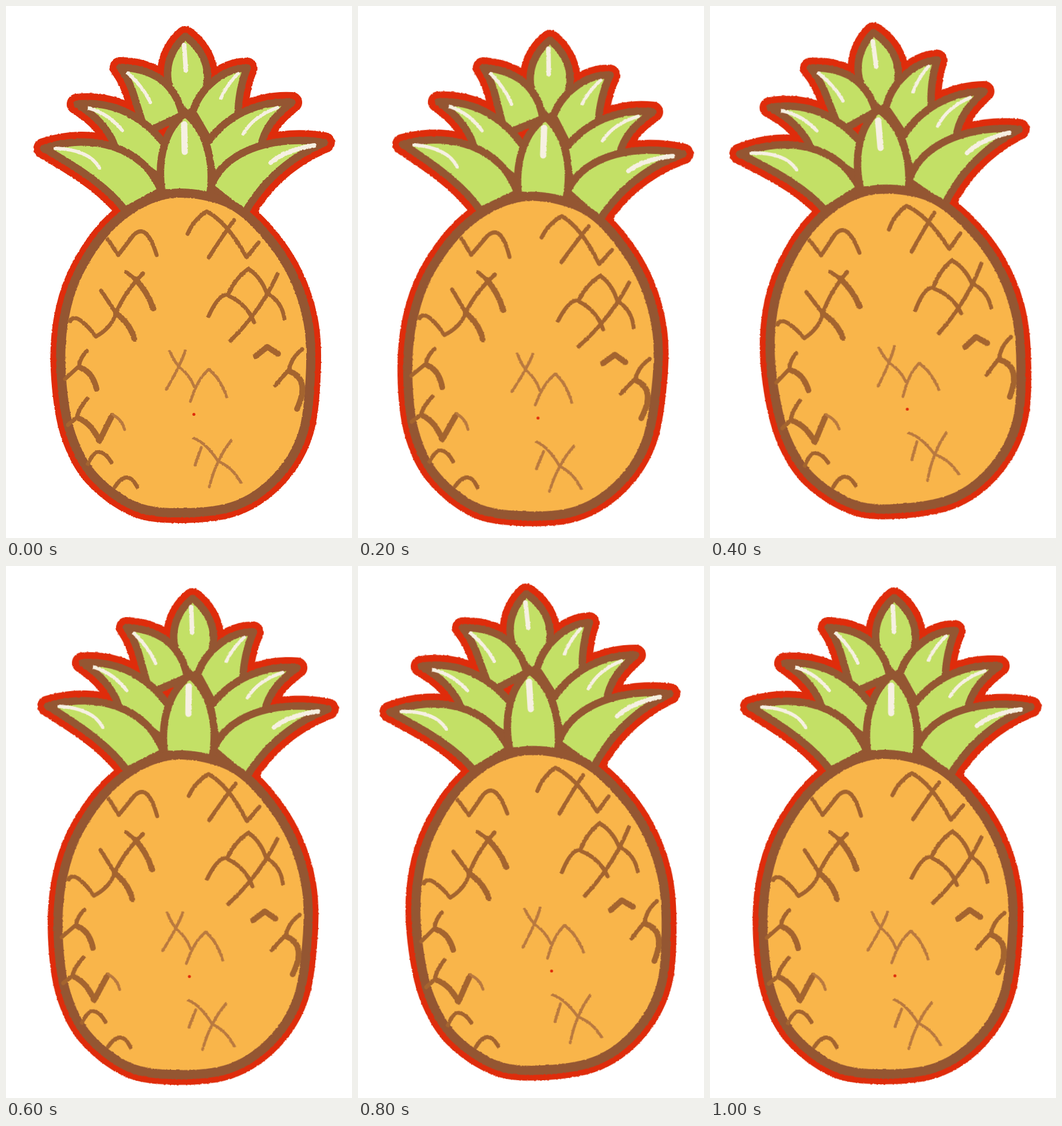
An HTML page for the animation above (1.2 s loop, 604 by 927 pixels).

```html
<!DOCTYPE html>
<html lang="en">
<head>
<meta charset="utf-8">
<title>Pineapple</title>
<style>
  html, body { margin: 0; width: 100%; height: 100%; overflow: hidden; background: #fff; }
  svg { display: block; width: 100%; height: 100%; }
  .fruit { transform-origin: 203px 463px; animation: wobble 1200ms step-end infinite; }
  @keyframes wobble {
    0%, 100% { transform: rotate(0deg); }
    16.66% { transform: rotate(3.13deg); }
    33.33% { transform: rotate(-3.85deg); }
    50% { transform: rotate(1.79deg); }
    66.66% { transform: translateX(-1px) rotate(-2.55deg); }
    83.33% { transform: rotate(1.19deg); }
  }
  path { stroke-linecap: round; stroke-linejoin: round; }
  .rim { fill: #df2c0b; stroke: #df2c0b; stroke-width: 36; }
  .leaf { fill: #c3e066; stroke: #945632; stroke-width: 13; }
  .flesh { fill: #f9b54a; stroke: #945632; stroke-width: 16; }
  .shine { fill: none; stroke: #f6f0e2; stroke-width: 6; }
  .marks { fill: none; stroke: #a4642f; stroke-width: 7; }
  .bold { stroke-width: 10; }
  .faint { stroke: #b9793f; stroke-width: 5; }
</style>
</head>
<body>
<svg viewBox="0 0 604 927">
  <defs>
    <filter id="rough" filterUnits="userSpaceOnUse" x="0" y="0" width="604" height="927" color-interpolation-filters="sRGB">
      <feTurbulence type="fractalNoise" baseFrequency=".3" seed="4"/>
      <feDisplacementMap in="SourceGraphic" scale="3" xChannelSelector="R" yChannelSelector="G"/>
    </filter>
    <!-- Leaves from back to front; each line is the middle of its outline -->
    <g id="leaves">
      <path d="M313 53C280 80 262 140 318 190C374 140 352 80 313 53Z"/>
      <path d="M199 107C250 108 295 130 308 190L245 220C230 190 225 140 199 107Z"/>
      <path d="M421 108C375 108 335 150 326 185L355 235L405 195C405 165 410 135 421 108Z"/>
      <path d="M124 171C185 165 240 190 280 245L270 300L190 245C180 215 155 190 124 171Z"/>
      <path d="M499 168C440 165 385 190 350 240L362 300L445 245C450 215 470 190 499 168Z"/>
      <path d="M66 248C150 220 240 245 271 322L208 356C180 320 140 290 66 248Z"/>
      <path d="M556 238C480 225 385 245 357 315L416 362C440 320 480 270 556 238Z"/>
      <path d="M313 187C280 212 263 260 272 325L356 330C365 265 346 212 313 187Z"/>
    </g>
    <path id="body"/>
  </defs>

  <g class="fruit">
    <g filter="url(#rough)">
      <g class="rim"><use href="#leaves"/><use href="#body"/></g>
      <use class="leaf" href="#leaves"/>
      <use class="flesh" href="#body"/>

      <g class="shine">
        <path stroke-width="8" d="M311 68L314 112"/>
        <path stroke-width="11" d="M311 206L312 254"/>
        <path stroke-width="8" d="M538 243Q490 250 462 273"/>
        <path d="M213 117Q240 142 252 168"/>
        <path d="M405 118Q385 138 375 161"/>
        <path d="M145 178Q180 188 203 217"/>
        <path d="M474 177Q432 192 414 223"/>
        <path d="M86 248Q145 250 163 282"/>
      </g>

      <g class="marks">
        <path d="M178 407L196 434L222 400Q245 375 263 434"/>
        <path d="M317 397Q328 372 350 358Q385 375 420 438L441 412M398 373Q375 405 354 438"/>
        <path d="M112 549Q122 531 157 576Q185 560 192 535Q207 499 239 466M210 464L226 476M166 496L192 535"/>
        <path class="bold" d="M226 476Q247 498 257 527M192 535Q217 554 224 580"/>
        <path d="M389 500Q400 475 423 458Q445 472 455 500Q482 515 486 545M474 467Q446 530 392 583M354 540Q368 508 383 503Q418 515 433 551"/>
        <path class="bold" d="M436 610L456 594L475 606"/>
        <path d="M517 598Q498 613 494 634L470 661"/>
        <path class="bold" d="M494 636Q532 650 508 702"/>
        <path d="M141 601Q130 612 127 628L103 650M142 684Q125 705 124 717L108 730"/>
        <path class="bold" d="M129 630Q151 637 158 667M126 718Q150 728 163 758L185 714"/>
        <path class="faint" d="M186 712Q203 721 207 738"/>
        <path d="M143 798Q160 758 184 795M190 838Q212 805 229 838"/>
        <path class="faint" d="M286 602Q294 620 303 630Q320 642 329 664M313 601Q305 625 280 668M322 689Q334 650 354 633Q375 650 385 681"/>
        <path class="faint" d="M328 753Q350 762 370 793Q395 804 410 830M393 757Q366 792 355 838M341 769L330 800"/>
      </g>
    </g>
    <circle fill="#df2c0b" cx="328" cy="711.5" r="2.6"/>
  </g>
</svg>
<script>
  // Closed Catmull-Rom curve through a few points
  function blob(pts) {
    const at = i => pts[(i + pts.length) % pts.length];
    const ease = (p, a, b) => p.map((v, k) => v + (b[k] - a[k]) / 6);
    return 'M' + at(0) + pts.map((p, i) => {
      const q = at(i + 1);
      return `C${ease(p, at(i - 1), q)} ${ease(q, at(i + 2), p)} ${q}`;
    }).join('') + 'Z';
  }

  document.getElementById('body').setAttribute('d', blob([
    [302, 326], [385, 342], [447, 391], [500, 468], [528, 555], [531, 650],
    [517, 748], [472, 822], [402, 870], [310, 883], [226, 872], [152, 818],
    [113, 745], [97, 650], [99, 560], [122, 475], [173, 394], [236, 344]
  ]));
</script>
</body>
</html>
```
